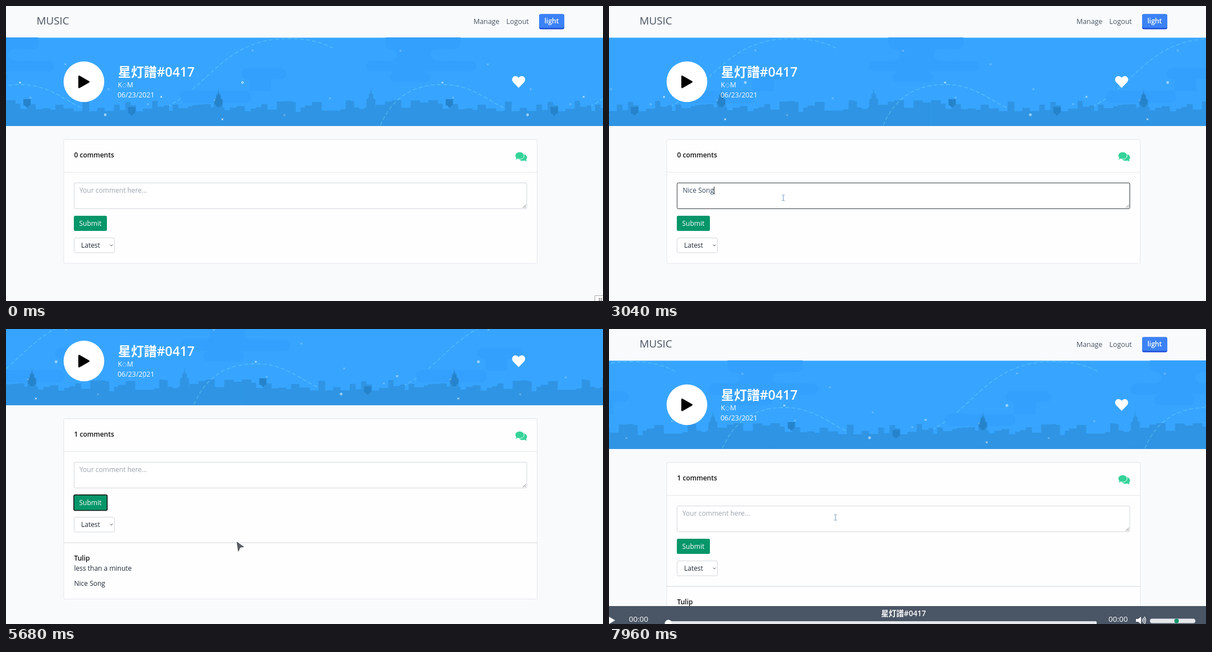
An HTML page that plays this animation: 1065x526 px, repeating every 8 s.

```html
<!DOCTYPE html>
<html lang="en">
<head>
<meta charset="utf-8">
<title>Song page</title>
<style>
html, body { margin: 0; width: 100%; height: 100%; overflow: hidden; background: #f8fafc; }
svg { display: block; }
text { font: 12px "Open Sans", "Noto Sans", "Noto Sans CJK JP", sans-serif; fill: #1f2937; white-space: pre; }
.b { font-weight: 600; fill: #111; }
.w { fill: #fff; }
.nav { font-size: 12.4px; fill: #4b5563; }
.player { font-size: 13.5px; }
.line { fill: #fefefe; stroke: #e5e7eb; }
.field { fill: #fff; stroke: #d3d7dd; }
.sky { fill: #37a5ff; }
.cloud { fill: #34a0fd; }
.city { fill: #2f94e3; }
.dark { fill: #2583cb; }

#drift, #page, #cursor { animation: 8s linear infinite; }
#drift { animation-name: drift; }
#page { animation-name: scroll; }
#cursor { animation-name: point; }

@keyframes drift {
  1% { transform: translateX(-6.2px); }
  100% { transform: translateX(-467.9px); }
}
@keyframes scroll {
  0%, 69% { transform: translateY(0); }
  71%, 81% { transform: translateY(-78px); }
  82.8%, 100% { transform: translateY(0); }
}
@keyframes point {
  0% { transform: translate(1070px, 540px); }
  10%, 11% { transform: translate(314px, 341px); }
  13%, 50% { transform: translate(311px, 342px); }
  53%, 56.5% { transform: translate(160px, 374px); }
  61.5% { transform: translate(341px, 402px); }
  64% { transform: translate(318px, 437px); }
  71%, 82% { transform: translate(412px, 380px); }
  87%, 92.5% { transform: translate(139px, 136px); }
  99.3%, 100% { transform: translate(404px, 336px); }
}
</style>
</head>
<body>
<svg width="1065" height="526" viewBox="0 0 1065 526">
  <defs>
    <path id="cross" d="M-1.5-1.5l3 3m0-3l-3 3" stroke="#fff"/>
    <path id="dome" class="dark" d="M31 166h13v9l-2 3h-2l-1 3h-3l-1-3h-3l-1-3z"/>
    <path id="tower" d="M0 145l1 10 3 3v6l4 3v14h3v33h-22v-33h3v-14l4-3v-6l3-3z"/>
    <g id="tile">
      <g class="cloud">
        <rect x="677" y="47" width="134" height="30" rx="10"/>
        <rect x="688" y="76" width="80" height="22"/>
        <rect x="643" y="97" width="196" height="20" rx="10"/>
        <rect x="685" y="117" width="72" height="19" rx="9.5"/>
        <rect x="695" y="112" width="50" height="12"/>
        <rect x="420" y="111" width="80" height="20" rx="10"/>
        <rect x="434" y="130" width="39" height="22"/>
        <rect x="311" y="151" width="126" height="22" rx="10"/>
      </g>
      <g class="sky">
        <rect x="658" y="77" width="40" height="20" rx="10"/>
        <rect x="758" y="77" width="40" height="20" rx="10"/>
      </g>
      <path id="skyline" class="city"/>
      <use href="#tower" class="city" x="379"/>
      <use href="#tower" class="city" x="651"/>
      <path class="dark" d="M379 152l1 6 3 2v5l3 2v9h-3v4h-8v-4h-3v-9l3-2v-5l3-2z"/>
      <use href="#dome"/>
      <use href="#dome" x="187" y="14"/>
      <path d="M668 213C690 160 730 140 778 140C855 140 870 197 960 197C1110 197 1110 58 1258 58C1290 58 1315 64 1337 75"
        fill="none" stroke="#6ed0f2" stroke-opacity=".6" stroke-width="1.3" stroke-dasharray="7 4"/>
      <g id="stars">
        <use href="#cross" x="25" y="136.5"/>
        <use href="#cross" x="277" y="162"/>
        <use href="#cross" x="386" y="202"/>
      </g>
      <g fill="none" stroke="#e2f6ff" stroke-width="1.1">
        <circle cx="422" cy="136.5" r="1.6"/>
        <circle cx="177" cy="194" r="1.6"/>
      </g>
    </g>
  </defs>

  <rect width="1065" height="526" fill="#f8fafc"/>

  <g id="page">
    <text x="54.5" y="33.3" style="font-size:18.8px;font-weight:500;fill:#4a5361">MUSIC</text>
    <text class="nav" x="834" y="32.2">Manage</text>
    <text class="nav" x="892.5" y="32.2">Logout</text>
    <rect x="951" y="14.5" width="45" height="27" rx="3.5" fill="#1d4ed8"/>
    <rect x="951" y="14.5" width="45" height="24.5" rx="3" fill="#3b82f6"/>
    <text class="b w" x="960.5" y="31.3">light</text>

    <svg y="56.5" width="1065" height="157" viewBox="0 56.5 1065 157">
      <rect class="sky" y="56" width="1065" height="158"/>
      <g id="drift">
        <use href="#tile" x="-753.5"/>
        <use href="#tile"/>
        <use href="#tile" x="753.5"/>
        <use href="#tile" x="1507"/>
      </g>
    </svg>

    <circle class="w" cx="139" cy="135" r="36.3"/>
    <path d="M130.5 125.5v19.5l17-9.75z" stroke="#000" stroke-width="3" stroke-linejoin="round"/>
    <text class="b w" x="200" y="126" style="font-size:23px">星灯譜#0417</text>
    <text class="w" x="199.5" y="144.5">K<tspan font-size="9">◇</tspan>M</text>
    <text class="w nav" x="199" y="162.5" style="fill:#fff">06/23/2021</text>
    <path class="w" d="M914.5 146l-9.7-10c-2.8-3-2.3-7.5.3-9.7c2.7-2.2 6.300-1.500 8.500.8l.9 1 .9-1c2.200-2.300 5.800-3 8.500-.8c2.600 2.200 3.100 6.700.3 9.700z"/>

    <rect class="line" x="103" y="238" width="844.5" height="221" rx="2"/>
    <g id="comment">
      <rect class="line" x="103" y="238" width="844.5" height="321.5" rx="2"/>
      <path d="M103 459h844.5" stroke="#dfe2e7" stroke-width="1.6"/>
      <text class="b" x="121.5" y="491">Tulip</text>
      <text x="121.5" y="509">less than a minute</text>
      <text x="121.5" y="536.2">Nice Song</text>
    </g>
    <path d="M103 296.5h844.5" stroke="#e5e7eb"/>
    <text class="b" id="none" x="121.5" y="270">0 comments</text>
    <text class="b" id="one" x="121.5" y="270">1 comments</text>
    <g fill="#34d399">
      <path d="M922 264c4 0 7.5 2.6 7.5 6c0 2-1 3.3-1.8 4.2c.3 1.3 1 2 1.8 2.8c-2 0-3.6-.6-4.7-1.4c-5 1.3-9.8-.7-10.8-4.6z"/>
      <path stroke="#fff" d="M916.5 260.2c4.4 0 7.7 2.9 7.7 6.5s-3.3 6.5-7.7 6.5c-1.3 0-2.5-.2-3.6-.7c-1.2.8-2.8 1.5-5 1.5c1-.9 1.7-2 2-3.2c-.8-1-1.6-2.3-1.6-4.1c0-3.6 3.8-6.5 8.2-6.5z"/>
    </g>

    <rect class="field" x="121.5" y="315.5" width="807.5" height="46" rx="2"/>
    <rect id="focus" x="121.5" y="315.5" width="807.5" height="46" rx="2" fill="none" stroke="#3a3f46"/>
    <path d="M922 360l5.5-5.5M925 360l2.5-2.5" stroke="#777"/>
    <text id="hint" x="131" y="333" style="fill:#9aa3af">Your comment here...</text>
    <text id="typed" x="131.5" y="333" style="fill:#34495e"></text>
    <rect id="caret" width="1" height="14" fill="#222"/>

    <rect x="121" y="374" width="59" height="27" rx="2.5" fill="#059669"/>
    <rect id="pressed" x="121" y="373.8" width="59.5" height="27.7" rx="2.5" fill="none" stroke="#0c1512" stroke-width="1.6"/>
    <text class="w" x="130.5" y="392">Submit</text>
    <rect class="field" x="121.5" y="413.5" width="72" height="26.5" rx="2.5"/>
    <text x="134" y="431">Latest</text>
    <path d="M185.5 425.5l2.5 2.5 2.5-2.5" fill="none" stroke="#555"/>
  </g>

  <g id="tip">
    <rect x="1050.5" y="516.5" width="20" height="14" fill="#fff" stroke="#aaa"/>
    <path d="M1057 522h7M1057 525h7M1058.5 520v6M1062 520v6" stroke="#777" stroke-width=".8"/>
  </g>

  <g id="player">
    <rect y="494" width="1065" height="32" fill="#4a5565"/>
    <path class="w" d="M0 513l11 6.5-11 6.5z"/>
    <text class="b w player" x="525.5" y="512" text-anchor="middle">星灯譜#0417</text>
    <text class="w player" x="35.5" y="521.5">00:00</text>
    <text class="w player" x="891" y="521.5">00:00</text>
    <rect x="106" y="521" width="764" height="8" rx="2" fill="#e5e7eb"/>
    <circle class="w" cx="106" cy="525" r="6.5"/>
    <path class="w" d="M940 517h4l5-4v13l-5-4h-4z"/>
    <path d="M951 517q2 2.5 0 5M953 515q3.6 4.5 0 9M955 513q5 6.5 0 13" fill="none" stroke="#fff" stroke-width="1.3"/>
    <rect x="965" y="516.5" width="81" height="8" rx="4" fill="#e5e7eb"/>
    <circle cx="1012.5" cy="520.5" r="4" fill="#059669"/>
  </g>

  <g id="cursor">
    <path id="arrow" d="M0 0l12 8.5-6.5.8-3 7.2z" fill="#5a5f64" stroke="#3a3e42" stroke-width=".8"/>
    <path id="beam" d="M-2.5-5h2l.5.5.5-.5h2M0-4.5v9M-2.5 5h2l.5-.5.5.5h2" fill="none" stroke="#6c93b8"/>
  </g>
</svg>
<script>
const LOOP = 8000, TILE = 753.5;
const $ = id => document.getElementById(id);

let seed = 7;
const random = (min, max) => {
  seed = seed * 16807 % 2147483647;
  return min + (max - min) * seed / 2147483647;
};

function add(parent, name, attrs = {}) {
  const el = document.createElementNS('http://www.w3.org/2000/svg', name);
  for (const k in attrs) el.setAttribute(k, attrs[k]);
  return parent.appendChild(el);
}

// Rooftops of random width and height
let roofs = 'M0 215';
for (let x = 0; x < TILE; x += random(6, 18))
  roofs += `H${x.toFixed(1)}V${random(168, 189).toFixed(1)}`;
$('skyline').setAttribute('d', `${roofs}H${TILE}V215z`);

// Faint stars, spread evenly with some scatter
for (let x = 40; x < TILE; x += 80)
  add($('stars'), 'use', { href: '#cross', x: x + random(-30, 30), y: random(75, 205), opacity: .45 });

// Steps a property through [time, value] pairs without blending.
const hold = (el, prop, pairs) => el.animate(
  pairs.map(([t, v]) => ({ offset: t / LOOP, [prop]: v, easing: 'steps(1)' })),
  { duration: LOOP, iterations: Infinity });

const toggle = (el, on, ...times) => hold(el, 'visibility',
  [0, ...times].map((t, i) => [t, (i % 2 === 0) === on ? 'visible' : 'hidden']));

// Typing at a steady pace
const TYPE = 1800, PER_KEY = 150, ENTER = 3300, SUBMIT = 4400, CLEAR = 4560, POSTED = 4990;
const typed = $('typed');
for (const c of 'Nice Song') add(typed, 'tspan').textContent = c;

const caretAt = (width, y) => `translate(${131.5 + width}px, ${y}px)`;
const caretPath = [[0, caretAt(0, 322)]];
[...typed.children].forEach((el, i) => {
  const t = TYPE + i * PER_KEY;
  toggle(el, false, t, CLEAR);
  caretPath.push([t, caretAt(typed.getSubStringLength(0, i + 1), 322)]);
});
caretPath.push([ENTER, caretAt(0, 340)]);
hold($('caret'), 'transform', caretPath);
toggle($('caret'), false, 1300, TYPE - 50, TYPE, SUBMIT);

toggle($('hint'), true, TYPE, CLEAR);
toggle($('focus'), false, 1300, SUBMIT);
toggle($('pressed'), false, SUBMIT, 7100);
toggle($('none'), true, POSTED);
toggle($('one'), false, POSTED);
toggle($('comment'), false, POSTED);
toggle($('tip'), true, 70);
toggle($('player'), false, 7250);

// The pointer becomes a beam while over the text box.
const overText = [720, 4130, 7890];
toggle($('beam'), false, ...overText);
toggle($('arrow'), true, ...overText);
</script>
</body>
</html>
```
